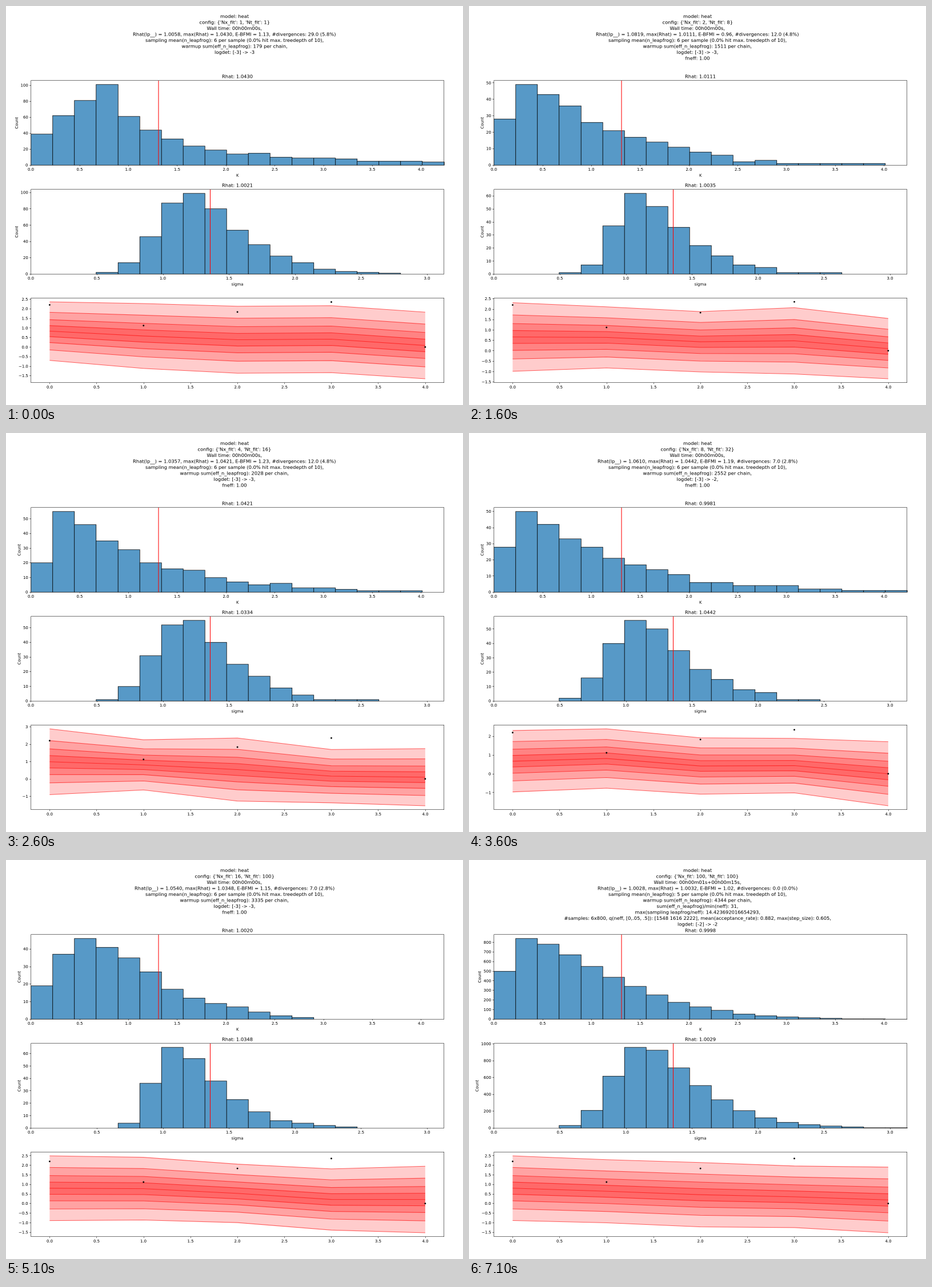
Write an HTML page with a canvas that moves like this. It is 800 by 700 pixels and loops after 7600 ms.

```html
<!DOCTYPE html>
<html lang="en">
<head>
<meta charset="utf-8">
<title>Heat model fit</title>
<style>
html, body { margin: 0; width: 100%; height: 100%; overflow: hidden; background: #fff; }
canvas { display: block; width: 800px; height: 700px; }
</style>
</head>
<body>
<canvas id="stage" width="1600" height="1400"></canvas>
<script>
const ctx = document.getElementById('stage').getContext('2d');

// Axes geometry, in canvas pixels (twice the stage size).
const LEFT = 87, RIGHT = 1533.5, WIDTH = RIGHT - LEFT, HEIGHT = 297, BINS = 19;
const TOPS = [261, 643, 1024.5];
const SMALL = 13.89, LARGE = 16.67, TICK = 4.86, PAD = 9.72;
const LOOP = 7600, FIRST = 100, STEP = 500, LAST = 15;

const observed = [2.2, 1.12, 1.83, 2.35, 0];

// Key fits. k: first count, peak, peak bin, tail width, tail power.
// sigma: peak, centre bin, left and right width. top, bottom: outer quantiles over time.
const fits = [
  { at: 0, scale: 2, lp: 1.0058, bfmi: 1.13, div: 29, warmup: 179, rhat: [1.0430, 1.0021],
    k: [20, 50.5, 3, 2.6, .7], sigma: [49.5, 4, 2.3, 3],
    top: [2.36, 2.27, 2.13, 2.16, 1.82], bottom: [-.70, -1.12, -1.37, -1.34, -1.66] },
  { at: 4, scale: 1, lp: 1.0819, bfmi: .96, div: 12, warmup: 1511, rhat: [1.0111, 1.0035],
    k: [30, 49, 1, 4.7, 1.3], sigma: [62, 3.2, 1.6, 2.7],
    top: [2.31, 2.11, 1.88, 2.07, 1.55], bottom: [-.99, -.83, -1.02, -1.12, -1.35] },
  { at: 6, scale: 1, lp: 1.0357, bfmi: 1.23, div: 12, warmup: 2028, rhat: [1.0421, 1.0334],
    k: [20, 55, 1, 4.3, 1.1], sigma: [55, 3.8, 2.2, 2.7],
    top: [2.88, 2.25, 2.35, 1.69, 1.74], bottom: [-.91, -.64, -1.28, -1.38, -1.55] },
  { at: 8, scale: 1, lp: 1.0610, bfmi: 1.19, div: 7, warmup: 2552, rhat: [.9981, 1.0442], logdet: '[-3] -> -2',
    k: [29, 50, 1, 4.6, 1.1], sigma: [56, 3.3, 2, 3],
    top: [2.31, 2.40, 1.92, 1.89, 1.71], bottom: [-.97, -.77, -1.09, -1.02, -1.71] },
  { at: 10, scale: 1, lp: 1.0442, bfmi: 1.07, div: 4, warmup: 3083, rhat: [.9866, 1.0407],
    k: [17, 48, 2, 4, 1.6], sigma: [71, 3.2, 1.25, 2.3],
    top: [2.51, 2.37, 2.03, 1.85, 2.02], bottom: [-.93, -.88, -.85, -1.36, -1.61] },
  { at: 13, scale: 1, lp: 1.0736, bfmi: 1.30, div: 12, warmup: 3839, rhat: [1.0329, 1.0230],
    k: [27, 42, 1, 5.7, 1.8], sigma: [53, 3.3, 2, 3.3],
    top: [2.45, 2.50, 2.11, 1.73, 1.80], bottom: [-.82, -.83, -1.30, -1.45, -1.37] },
  { at: LAST, scale: 4800 / 252, lp: 1.0028, bfmi: 1.02, div: 0, warmup: 4344, rhat: [.9998, 1.0029],
    k: [26.5, 44.1, 1, 5.3, 1.55], sigma: [50.3, 3.5, 2.06, 3.3],
    top: [2.49, 2.29, 2.14, 1.96, 1.90], bottom: [-.89, -1.01, -1.22, -1.26, -1.53] }
];

function mix(a, b, f) {
  if (Array.isArray(a)) return a.map((v, i) => mix(v, b[i], f));
  return a + (b - a) * f;
}

function stateAt(at) {
  const next = fits.findIndex(fit => fit.at >= at), b = fits[next];
  if (b.at === at) return b;
  const a = fits[next - 1], state = { at, scale: 1 };
  for (const key of ['lp', 'bfmi', 'div', 'warmup', 'rhat', 'k', 'sigma', 'top', 'bottom'])
    state[key] = mix(a[key], b[key], (at - a.at) / (b.at - a.at));
  return state;
}

// Grid sizes double in turn, up to 100.
function gridSize(at) {
  if (at >= 14) return [100, 100];
  const doublings = Math.max(0, at - 3);
  const nx = 2 ** Math.ceil(doublings / 2);
  const nt = at < 4 ? 2 ** at : 2 ** (3 + Math.floor(doublings / 2));
  return at > 10 ? [2 ** (at - 7), 100] : [nx, nt];
}

const noise = seed => {
  const v = Math.sin(seed * 127.1) * 43758.5453;
  return (v - Math.floor(v)) * 2 - 1;
};

// Scales a curve to its peak and adds sampling noise that fades towards the peak.
function sampleCounts(curve, peak, scale, seed) {
  const values = Array.from({ length: BINS }, (_, i) => curve(i));
  const max = Math.max(...values);
  return values.map((v, i) => {
    const n = v / max * peak * scale;
    return Math.round(n + 0.8 * noise(seed + i) * Math.sqrt(n) * (1 - v / max));
  });
}

function kCounts({ at, scale, k: [first, peak, mode, width, power] }) {
  const curve = i => i < mode ? mix(first, peak, i / mode) : peak * Math.exp(-(((i - mode) / width) ** power));
  return sampleCounts(curve, peak, scale, at * 40 + 1);
}

function sigmaCounts({ at, scale, sigma: [peak, centre, left, right] }) {
  const curve = i => i < centre
    ? Math.exp(-(((centre - i) / left) ** 2.4))
    : Math.exp(-(((i - centre) / right) ** 1.4));
  return sampleCounts(curve, peak, scale, at * 40 + 21).slice(0, BINS - 3);
}

// Nine quantiles per time, tightening towards the median.
function quantiles({ top, bottom }) {
  return top.map((hi, i) => Array.from({ length: 9 }, (_, j) => {
    const u = j / 4 - 1, z = u * (0.75 + 0.25 * Math.abs(u) ** 3);
    return mix(hi, bottom[i], (1 + z) / 2);
  }));
}

function header(s) {
  const [nx, nt] = gridSize(s.at), last = s.at === LAST;
  const div = Math.round(s.div), percent = div / (s.at ? 250 : 500) * 100;
  const maxRhat = last ? 1.0032 : Math.max(...s.rhat);
  const lines = [
    'model: heat',
    `config: {'Nx_fit': ${nx}, 'Nt_fit': ${nt}}`,
    `Wall time: ${last ? '00h00m01s+00h00m15s' : '00h00m00s'},`,
    `Rhat(lp__) = ${s.lp.toFixed(4)}, max(Rhat) = ${maxRhat.toFixed(4)}, E-BFMI = ${s.bfmi.toFixed(2)}, ` +
      `#divergences: ${div.toFixed(1)} (${percent.toFixed(1)}%)`,
    `sampling mean(n_leapfrog): ${last ? 5 : 6} per sample (0.0% hit max. treedepth of 10),`,
    `warmup sum(eff_n_leapfrog): ${Math.round(s.warmup)} per chain,`
  ];
  if (last) {
    lines.push('sum(eff_n_leapfrog)/min(neff): 31,', 'max(sampling leapfrog/neff): 14.423692016654293,',
      '#samples: 6x800, q(neff, [0,.05, .5]): [1548 1616 2222], mean(acceptance_rate): 0.882, max(step_size): 0.605,',
      'logdet: [-2] -> -2');
  } else {
    const logdet = `logdet: ${s.logdet || '[-3] -> -3'}`;
    lines.push(...(s.at ? [logdet + ',', 'fneff: 1.00'] : [logdet]));
  }
  return lines;
}

// Draws text on whole pixels and returns its width; align is 0 (left) to 1 (right).
function text(str, x, y, size = SMALL, align = 0.5) {
  ctx.font = `${size}px "DejaVu Sans", sans-serif`;
  ctx.fillStyle = '#000';
  const { width } = ctx.measureText(str);
  ctx.fillText(str, Math.round(x - width * align), Math.round(y));
  return width;
}

function line(points, color, width) {
  ctx.beginPath();
  points.forEach(([x, y]) => ctx.lineTo(x, y));
  ctx.strokeStyle = color;
  ctx.lineWidth = width;
  ctx.stroke();
}

const snap = v => Math.round(v) + 0.5;

function tickStep(range) {
  let power = 10 ** Math.floor(Math.log10(range / 9));
  for (;; power *= 10)
    for (const m of [1, 2, 5]) if (range / (m * power) <= 9) return m * power;
}

// Draws frame, ticks and labels; returns the left edge of the widest y label.
function axes(top, xZero, xUnit, xMax, lo, hi) {
  const bottom = top + HEIGHT, step = tickStep(hi - lo);
  ctx.strokeStyle = '#000';
  ctx.lineWidth = 1.11;
  ctx.strokeRect(LEFT + 0.5, Math.floor(top) + 0.5, Math.floor(WIDTH), HEIGHT);
  for (let v = 0; v <= xMax; v += 0.5) {
    const x = xZero + v * xUnit;
    line([[snap(x), bottom], [snap(x), bottom + TICK]], '#000', 1.11);
    text(v.toFixed(1), x, bottom + 20);
  }
  let widest = 0;
  for (let i = Math.ceil(lo / step); i * step <= hi; i++) {
    const y = bottom - (i * step - lo) / (hi - lo) * HEIGHT;
    const label = (i * step).toFixed(step < 1 ? 1 : 0).replace('-', '\u2212');
    line([[LEFT - TICK, snap(y)], [LEFT, snap(y)]], '#000', 1.11);
    widest = Math.max(widest, text(label, LEFT - PAD, y + 5.2, SMALL, 1));
  }
  return LEFT - PAD - widest;
}

function histogram(top, counts, firstBin, name, rhat, unit, xMax, markX) {
  const bottom = top + HEIGHT, hi = Math.max(...counts) * 1.05;
  const edge = bin => snap(LEFT + WIDTH * bin / BINS);
  ctx.fillStyle = '#5799c7';
  ctx.strokeStyle = '#000';
  ctx.lineWidth = 1.6;
  counts.forEach((n, i) => {
    if (n <= 0) return;
    const x = edge(i + firstBin), y = snap(bottom - n / hi * HEIGHT);
    ctx.beginPath();
    ctx.rect(x, y, edge(i + firstBin + 1) - x, bottom + 0.5 - y);
    ctx.fill();
    ctx.stroke();
  });
  line([[markX, top], [markX, bottom]], '#f00', 2.08);
  const labelEdge = axes(top, LEFT, unit, xMax, 0, hi);
  text(name, (LEFT + RIGHT) / 2, bottom + 40.5);
  text(`Rhat: ${rhat.toFixed(4)}`, (LEFT + RIGHT) / 2, top - 8.3, LARGE);
  ctx.save();
  ctx.translate(Math.round(labelEdge - 8.9), Math.round(top + HEIGHT / 2));
  ctx.rotate(-Math.PI / 2);
  text('Count', 0, 0);
  ctx.restore();
}

function bandPlot(top, band) {
  const all = [...band.flat(), ...observed];
  const min = Math.min(...all), max = Math.max(...all), margin = (max - min) * 0.05;
  const lo = min - margin, hi = max + margin;
  const unit = WIDTH / 4.4, zero = LEFT + unit * 0.2;
  const toPoint = (v, i) => [zero + i * unit, top + (hi - v) / (hi - lo) * HEIGHT];
  const curve = q => band.map((row, i) => toPoint(row[q], i));
  for (let q = 0; q < 4; q++) {
    ctx.beginPath();
    [...curve(q), ...curve(8 - q).reverse()].forEach(([x, y]) => ctx.lineTo(x, y));
    ctx.fillStyle = 'rgba(255,0,0,.2)';
    ctx.fill();
  }
  for (let q = 0; q < 9; q++) line(curve(q), 'rgba(255,0,0,.6)', 2.08);
  ctx.fillStyle = '#000';
  observed.forEach((v, i) => {
    ctx.beginPath();
    ctx.arc(...toPoint(v, i), 2.8, 0, 2 * Math.PI);
    ctx.fill();
  });
  axes(top, zero, unit, 4, lo, hi);
}

function draw(s) {
  ctx.fillStyle = '#fff';
  ctx.fillRect(0, 0, 1600, 1400);
  header(s).forEach((str, i) => text(str, 800, 42 + i * 21.05, LARGE));
  histogram(TOPS[0], kCounts(s), 0, 'K', s.rhat[0], 341.5, 4, 534);
  histogram(TOPS[1], sigmaCounts(s), 3, 'sigma', s.rhat[1], 462.5, 3, 715);
  bandPlot(TOPS[2], quantiles(s));
}

let shown = -1;
function tick() {
  const t = performance.now() % LOOP;
  const index = t < FIRST ? 0 : 1 + Math.floor((t - FIRST) / STEP);
  if (index !== shown) draw(stateAt(shown = index));
  requestAnimationFrame(tick);
}
tick();
</script>
</body>
</html>
```
